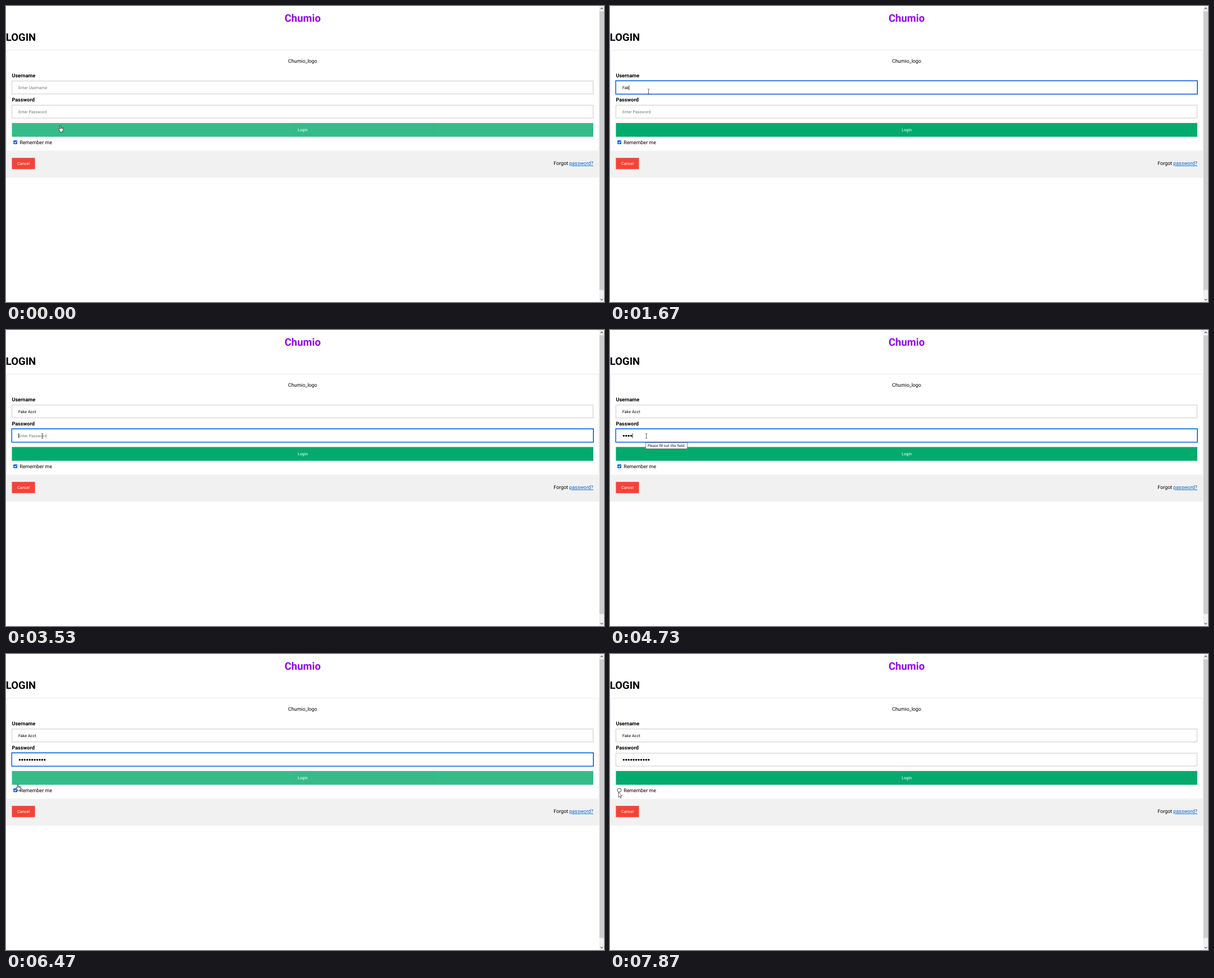
An HTML page for the animation above (8 s loop, 1063 by 527 pixels).

```html
<!DOCTYPE html>
<html lang="en">
<head>
<meta charset="utf-8">
<title>Login form</title>
<style>
  html, body { margin: 0; width: 100%; height: 100%; overflow: hidden; background: #fff; }
  svg { display: block; width: 100%; height: 100%; }
  text { font: 8.86px Roboto, sans-serif; text-rendering: geometricPrecision; }
  .h1 { font-size: 18.5px; font-weight: 700; }
  .label { font-size: 9.15px; font-weight: 700; }
  .small { font-size: 7.2px; }
  .hint { fill: #757575; }
  .light { fill: #fff; }
  .mid { text-anchor: middle; }
  .field { fill: #fff; stroke: #ccc; }
  .ring { fill: none; stroke: #0060df; stroke-width: 1.5; }
  .tip { font: 6.2px "Noto Sans", "Open Sans", sans-serif; }
</style>
</head>
<body>
<svg viewBox="0 0 1063 527">
  <rect width="1063" height="527" fill="#fff"/>
  <text class="h1 mid" x="527.3" y="28.4" fill="#9400ea">Chumio</text>
  <text class="h1" x="-.2" y="61.9">LOGIN</text>

  <rect x=".8" y="78.6" width="1053" height="226" fill="none" stroke="#f1f1f1" stroke-width="1.66"/>
  <rect y="257.6" width="1054.5" height="47.7" fill="#f1f1f1"/>
  <text class="mid" x="527.3" y="100.9">Chumio_logo</text>

  <text class="label" x="10.4" y="127">Username</text>
  <rect class="field" x="10.5" y="133.5" width="1033" height="23"/>
  <text class="small hint" id="nameHint" x="22" y="148.1">Enter Username</text>
  <text class="small" id="name" x="22" y="148.1"></text>

  <text class="label" x="10.4" y="169.7">Password</text>
  <rect class="field" x="10.5" y="176.5" width="1033" height="23"/>
  <text class="small hint" id="passHint" x="22" y="190.8">Enter Password</text>
  <g id="dots"></g>

  <rect class="ring" id="ring" x="10.25" width="1034" height="23.8"/>
  <rect id="caret" width=".8" height="8.6"/>

  <g id="login">
    <rect x="10.5" y="208.3" width="1033.5" height="24.5" fill="#04aa6d"/>
    <text class="small light mid" x="527.4" y="223.4">Login</text>
  </g>

  <rect id="box" x="13.2" y="239.2" width="6.8" height="6.8" rx="1"/>
  <path id="check" d="M14.7 242.7l1.4 1.4 2.5-3" fill="none" stroke="#fff" stroke-width="1.1"/>
  <text x="24.2" y="245.7">Remember me</text>

  <rect x="10.5" y="270.4" width="41" height="20.1" fill="#f44336"/>
  <text class="small light mid" x="31" y="283.2">Cancel</text>
  <text x="1044" y="283.2" text-anchor="end">Forgot <tspan fill="#0066cc" text-decoration="underline">password?</tspan></text>

  <g id="tooltip">
    <rect x="63.7" y="200.5" width="73.8" height="11" fill="#fff" stroke="#666" stroke-width=".8"/>
    <text class="tip" x="66.9" y="208.3">Please fill out this field.</text>
  </g>

  <rect x="1054.5" width="8.5" height="527" fill="#f0f0f0"/>
  <rect x="1055" y="9.5" width="8" height="496" fill="#cdcdcd"/>
  <path d="M1056.8 5.6l2.2-2.2 2.2 2.2M1056.8 521.6l2.2 2.2 2.2-2.2" fill="none" stroke="#505050" stroke-width="1.1"/>

  <g id="cursor">
    <path id="hand" fill="#fff" stroke="#000" stroke-width="1.2" d="M0 .5C-1 .5-1.5 1.2-1.5 2V12L-3.3 10.2C-4.3 9.2-6 9.8-5.9 11.2L-2 17V21.5H7.5V18L9.8 14V9C9.8 7.6 7.7 7.4 7.3 8.6 7.1 7.2 4.9 6.9 4.5 8.1 4.2 6.8 1.9 6.6 1.5 7.7V2C1.5 1.2 1 .5 0 .5ZM1.5 8V12M4.5 8.5V12M7.3 9V12"/>
    <path id="beam" fill="none" stroke="#222" stroke-width="1.3" d="M-3-8H-1L0-7 1-8H3M0-7V7M-3 8H-1L0 7 1 8H3"/>
    <path id="arrow" fill="#fff" stroke="#000" stroke-width="1.1" d="M.5.7V17L4.3 13.4 7 19.4 9.4 18.4 6.8 12.5H12Z"/>
  </g>
</svg>
<script>
const LOOP = 8000, SCALE = 0.5536;
const NAME = 'Fake Acct';
const nameKeys = [1200, 1400, 1600, 1870, 2070, 2270, 2470, 2600, 2730];
const passKeys = [4130, 4330, 4530, 4730, 4870, 5070, 5330, 5470, 5600, 5800, 6130];

// Pointer stops: time, x, y, shape
const stops = [
  [0, 96.5, 212.4, 'hand'], [70, 95, 209.5, 'hand'], [130, 90, 196, 'beam'],
  [200, 82, 181, 'beam'], [270, 74, 161, 'arrow'], [330, 68.5, 152.2, 'beam'],
  [3200, 68, 154, 'beam'], [3270, 67, 164, 'arrow'], [3330, 66, 180, 'beam'],
  [3400, 64.6, 188.6, 'beam'], [6130, 60, 194, 'beam'], [6200, 52, 202, 'arrow'],
  [6270, 43, 211.2, 'hand'], [6330, 33, 222, 'hand'], [6400, 25, 229, 'hand'],
  [6470, 21, 231.5, 'hand'], [6670, 18, 235, 'arrow'], [6730, 15.2, 237.7, 'arrow'],
  [6800, 15, 242, 'arrow'], [6870, 15, 244.5, 'arrow'], [6930, 14.9, 245.8, 'arrow']
];
const caretOn = [[470, 1000], [1200, 3130], [3470, 4000], [4130, 6130], [6670, 7200]];

const $ = id => document.getElementById(id);
const show = (id, on) => { $(id).style.display = on ? '' : 'none'; };
const set = (id, attrs) => {
  for (const key in attrs) $(id).setAttribute(key, attrs[key]);
};
const within = (t, a, b) => t >= a && t < b;
const typed = (keys, t) => keys.filter(k => k <= t).length;

passKeys.forEach((_, i) => {
  const dot = document.createElementNS($('dots').namespaceURI, 'circle');
  dot.setAttribute('cx', 24.4 + 4.43 * i);
  dot.setAttribute('cy', 188.3);
  dot.setAttribute('r', 1.65);
  $('dots').append(dot);
});

function drawFields(t) {
  const chars = typed(nameKeys, t), dots = typed(passKeys, t);
  $('name').textContent = NAME.slice(0, chars);
  show('nameHint', !chars);
  show('passHint', !dots);
  [...$('dots').children].forEach((d, i) => { d.style.display = i < dots ? '' : 'none'; });

  const inPass = t >= 3470;
  show('ring', within(t, 470, 7600));
  set('ring', { y: inPass ? 175.9 : 133.1 });
  const width = inPass ? 4.43 * dots : chars && $('name').getComputedTextLength();
  show('caret', caretOn.some(([a, b]) => within(t, a, b)));
  set('caret', { x: 22 + width, y: inPass ? 183.8 : 141.2 });
}

function drawCheckbox(t) {
  const checked = t < 7730;
  const fill = t < 6730 ? '#0060df' : t < 7600 ? '#0250bb' : '#054096';
  show('check', checked);
  set('box', checked
    ? { x: 13.2, y: 239.2, width: 6.8, height: 6.8, fill, stroke: 'none' }
    : { x: 13.6, y: 239.6, width: 6, height: 6, fill: '#fff', stroke: '#4a4a55' });
}

function drawCursor(t) {
  const [, x, y, shape] = stops.filter(s => s[0] <= t).pop();
  set('cursor', { transform: `translate(${x} ${y}) scale(${SCALE})` });
  ['hand', 'beam', 'arrow'].forEach(s => show(s, s === shape));
}

function draw(t) {
  drawFields(t);
  drawCheckbox(t);
  drawCursor(t);
  const hover = t < 130 || within(t, 6330, 6670);
  set('login', { opacity: hover ? 0.8 : 1 });
  show('tooltip', within(t, 4000, 6130));
  set('tooltip', { opacity: t < 4070 ? 0.35 : t < 4130 ? 0.7 : 1 });
}

function tick() {
  draw(performance.now() % LOOP);
  requestAnimationFrame(tick);
}
tick();
</script>
</body>
</html>
```
